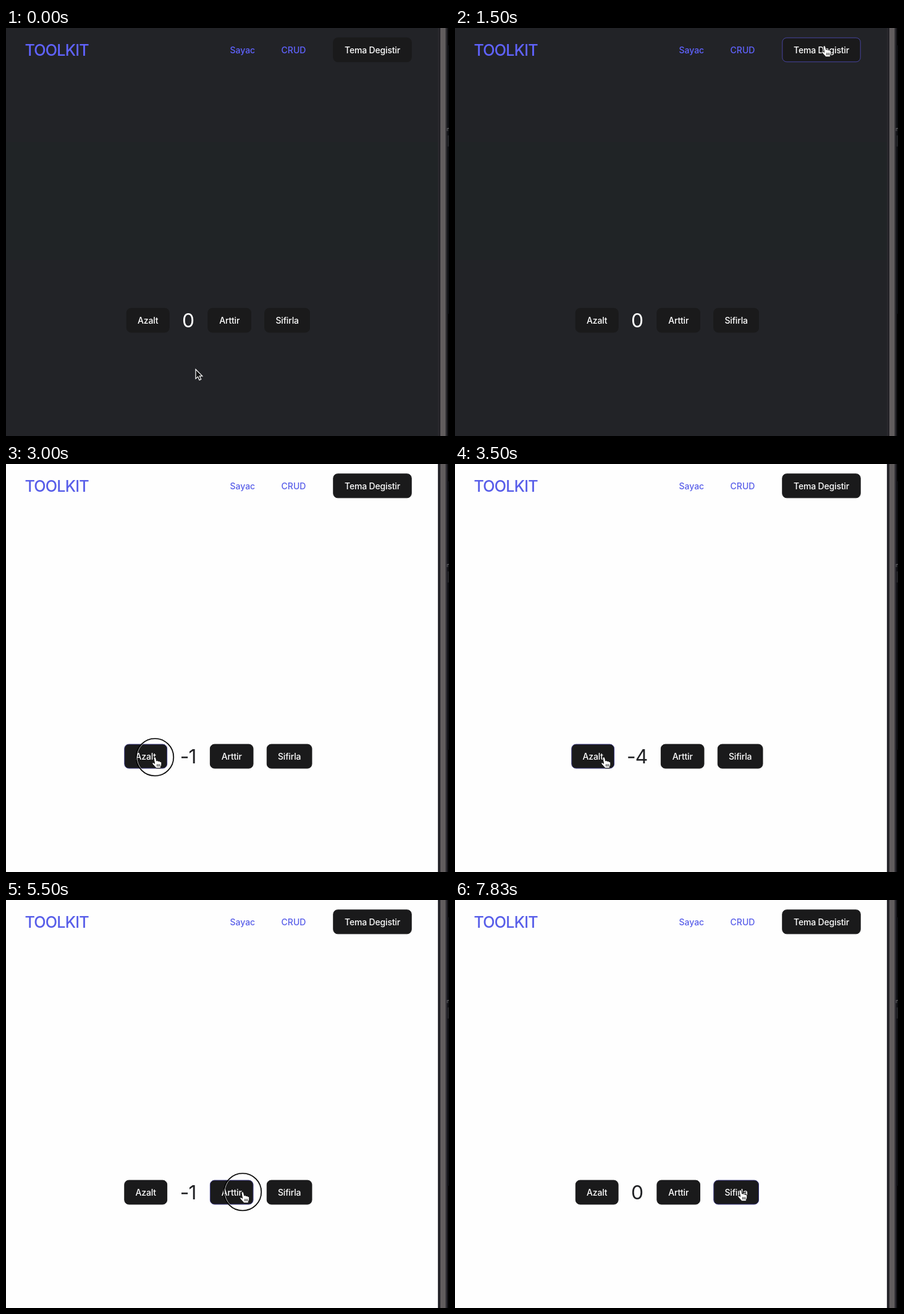
An HTML page for the animation above (8000 ms loop, 717 by 661 pixels).

```html
<!DOCTYPE html>
<html lang="tr">
<head>
<meta charset="utf-8">
<title>Toolkit</title>
<style>
  html, body { margin: 0; width: 100%; height: 100%; overflow: hidden; background: #000; }
  svg { display: block; width: 717px; height: 661px; font-family: Inter, Roboto, sans-serif; cursor: default;
    --page: #fefefe; --ink: #212225; --link: #585ee9; --edge: #2c2b31; --hover: #38377c; }
  svg.dark { --page: #222327; --ink: #fff; --link: #6063ff; --edge: #29282d; --hover: #4745a0; }
  .page { fill: var(--page); }
  .band { fill: #202426; display: none; }
  .dark .band { display: block; }
  .label { font-size: 14px; font-weight: 500; letter-spacing: -.17px; }
  .link { fill: var(--link); letter-spacing: 0; }
  .title { font-size: 25.2px; font-weight: 500; letter-spacing: -.8px; }
  .count { font-size: 31.8px; letter-spacing: -1px; fill: var(--ink); text-anchor: middle; }
  .button rect { fill: #1a1a1b; stroke: #1a1a1b; }
  .button.hover rect { stroke: var(--hover); }
  .button text { fill: #fff; text-anchor: middle; }
  .edge { fill: var(--edge); }
  .ring { fill: none; }
  .hand { fill: #fff; stroke: #111; stroke-linejoin: round; }
  .arrow { fill: #111; stroke: #fff; stroke-width: 1.2; }
</style>
</head>
<body>
<svg id="stage" class="dark" viewBox="0 0 717 661">
  <rect class="page" width="699" height="661"/>
  <rect class="band" y="185" width="699" height="191"/>

  <rect class="edge" x="699" width="16" height="661"/>
  <rect x="701" width="2" height="661" fill="#222126"/>
  <rect x="703" width="8.5" height="661" fill="#615d5e"/>
  <rect x="714.5" width="2.5" height="661" fill="#050506"/>
  <rect x="714.5" y="28" width="2.5" height="435" fill="#0d0e12"/>
  <rect x="714.5" y="174" width="2.5" height="18" fill="#202125"/>
  <text x="713" y="167" font-size="9" fill="#77777a">n</text>

  <text class="title link" x="30.4" y="45.3">TOOLKIT</text>
  <text class="label link" x="362.4" y="40.6">Sayac</text>
  <text class="label link" x="445.6" y="40.6">CRUD</text>
  <g id="buttons"></g>
  <text id="count" class="count" x="294.6" y="485.4">0</text>

  <g id="pointer">
    <g id="ring" class="ring">
      <circle r="29" stroke="#d5d5d5" stroke-width=".9"/>
      <circle r="30.3" stroke="#000" stroke-width="1.6"/>
    </g>
    <path id="arrow" class="arrow" d="M0 0V15.2L3.6 11.9L6 17.4L8.7 16.2L6.3 10.9H10.8Z"/>
    <g id="hand" class="hand">
      <path stroke-width="1" d="M-2 1.5Q-1.8-.5 0-.3Q1.5 0 1.8 2L2.6 6Q4.5 5 5.6 6.6Q7.4 5.8 8.4 7.4Q10.6 7 10.8 9.4Q11.2 13 9.4 15.4L9.2 17.8H2.2Q-.6 14.6-4 11Q-5 9-3 8.8Q-1.6 9-.4 10.4Z"/>
      <path stroke-width=".9" d="M3.6 11.2V15.2M5.7 11.2V15.2M7.8 11.2V15.2"/>
    </g>
  </g>
</svg>
<script>
  const LOOP = 8000, STEPS_PER_SECOND = 6;
  const $ = id => document.getElementById(id);

  // side: direction in which a button moves when the count gets wider
  const buttons = [
    { text: 'Tema Degistir', x: 529.3, y: 15.4, w: 127.4, side: 0 },
    { text: 'Azalt', x: 194.8, y: 453.6, w: 69.8, side: -1 },
    { text: 'Arttir', x: 326.4, y: 453.6, w: 70.6, side: 1 },
    { text: 'Sifirla', x: 418.3, y: 453.6, w: 73.7, side: 1 }
  ];
  const BUTTON_HEIGHT = 39.9;

  for (const b of buttons) {
    $('buttons').insertAdjacentHTML('beforeend', `<g class="button">
      <rect x="${b.x + .5}" y="${b.y + .5}" width="${b.w - 1}" height="${BUTTON_HEIGHT - 1}" rx="7"/>
      <text class="label" x="${b.x + b.w / 2}" y="${b.y + 25.1}">${b.text}</text></g>`);
    b.node = $('buttons').lastElementChild;
  }

  // step, x, y of the pointer tip
  const path = [
    [0, 307, 553], [1, 307, 553], [7, 598, 29], [11, 598, 29], [15, 292, 573],
    [17, 241, 475], [22, 241, 475], [26, 375, 458], [27, 377, 458], [29, 383, 473],
    [33, 383, 473], [36, 384.3, 467.5], [41, 384.3, 467.5], [44, 462, 470], [48, 462, 470]
  ];
  const pressed = new Set([18, 20, 29, 31, 33, 35, 37, 39, 45]);

  function pointerAt(step) {
    const i = path.findIndex(p => p[0] > step);
    const [s0, x0, y0] = path[i - 1], [s1, x1, y1] = path[i];
    const u = (step - s0) / (s1 - s0), e = u * u * (3 - 2 * u);
    return [x0 + (x1 - x0) * e, y0 + (y1 - y0) * e];
  }

  function countAt(step) {
    if (step < 18) return 0;
    if (step < 29) return -Math.min(5, step - 17);
    if (step < 46) return Math.min(5, -4 + Math.floor((step - 29) * 5 / 6));
    return 0;
  }

  function draw(step) {
    const [x, y] = pointerAt(step), count = countAt(step);
    const shift = (count < 0 ? 6.5 : 0) - (Math.abs(count) === 1 ? 3 : 0);
    let over = false;
    for (const b of buttons) {
      const dx = b.side * shift, left = b.x + dx;
      const hit = x >= left && x <= left + b.w && y >= b.y && y <= b.y + BUTTON_HEIGHT;
      b.node.setAttribute('transform', `translate(${dx} 0)`);
      b.node.classList.toggle('hover', hit);
      over = over || hit;
    }
    $('stage').classList.toggle('dark', step < 10);
    $('count').textContent = count;
    $('pointer').setAttribute('transform', `translate(${x} ${y})`);
    $('hand').style.display = over ? '' : 'none';
    $('arrow').style.display = over ? 'none' : '';
    $('ring').style.display = pressed.has(step) ? '' : 'none';
  }

  const start = performance.now();
  function tick() {
    const t = (performance.now() - start) % LOOP;
    draw(Math.floor((t + 5) * STEPS_PER_SECOND / 1000) % (LOOP * STEPS_PER_SECOND / 1000));
    requestAnimationFrame(tick);
  }
  tick();
</script>
</body>
</html>
```
